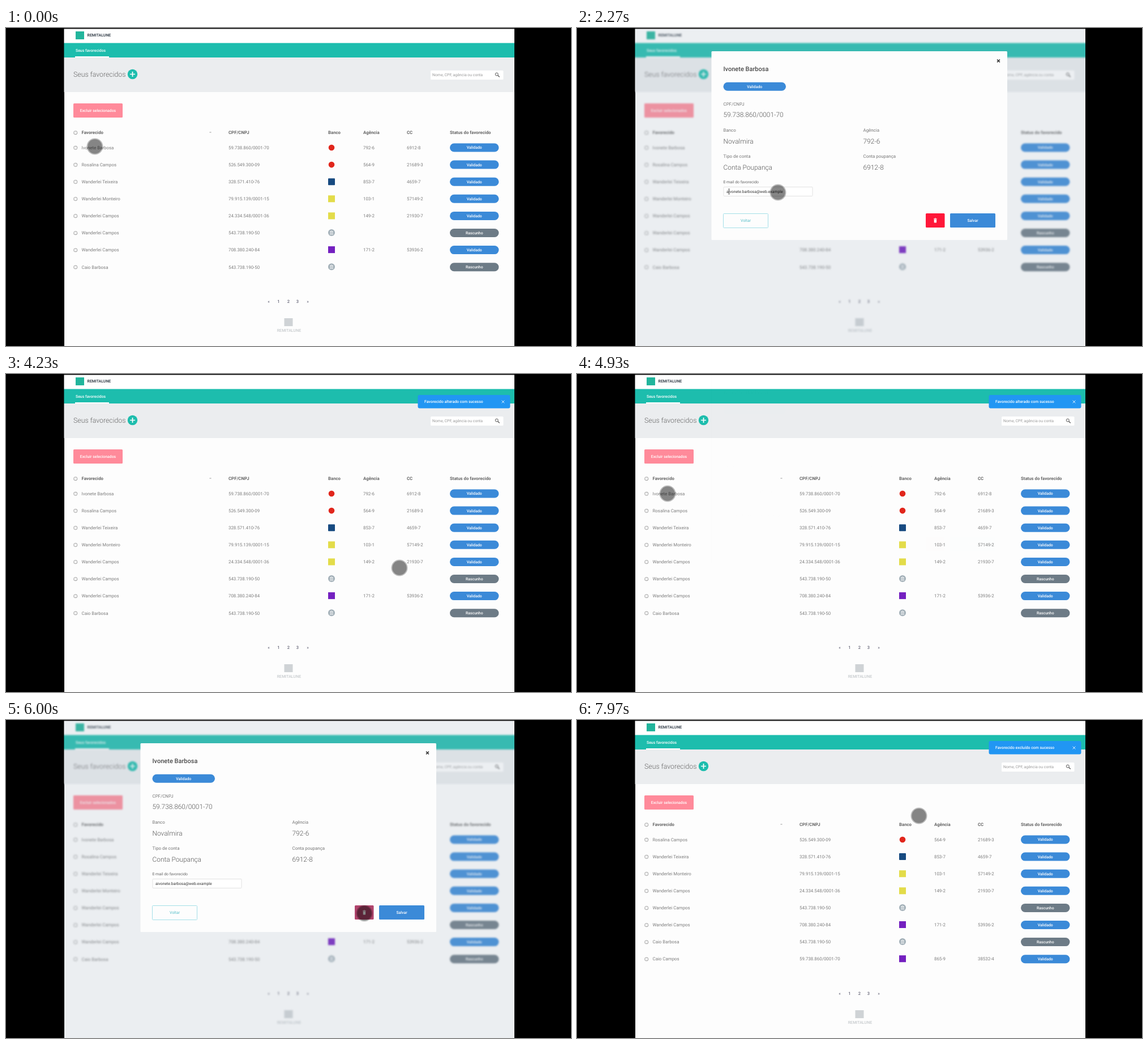
These frames come from a looping animation (998x561 px, 8 s). An HTML page:

```html
<!DOCTYPE html>
<html lang="pt-BR">
<head>
<meta charset="utf-8">
<title>Favorecidos</title>
<style>
html, body { margin: 0; width: 100%; height: 100%; overflow: hidden; background: #000; }
svg { display: block; width: 998px; height: 561px; }
text { font-family: Roboto, Arial, sans-serif; text-rendering: geometricPrecision; white-space: pre; }
.light { font-weight: 300; }
.mid { font-weight: 500; }
.bold { font-weight: 700; }
.c { text-anchor: middle; }

#page, #veil, #edit, #confirm, #cursor, #saved, #removed, .anim { animation: 8s linear infinite; }
#page { animation-name: blur; }
#veil { animation-name: veil; }
#edit { animation-name: edit; }
#confirm { animation-name: confirm; }
#cursor { animation-name: cursor; }
#saved { animation-name: saved; }
#removed { animation-name: removed; }
.anim { animation-timing-function: step-end; }
#first { animation-name: leave; }
#rest { animation-name: lift; }
#last { animation-name: enter; }
#mail { animation-name: before; }
#mail2 { animation-name: after; }
#caret { animation-name: caret; }
#saveBtn { animation-name: saveHover; }
#trashBtn { animation-name: trashHover; }
#okBtn { animation-name: okHover; }

@keyframes blur {
  0%, .375%, 44.9%, 61.625%, 91.2%, 100% { filter: blur(0px); }
  3.75%, 42.6%, 64.5%, 89.2% { filter: blur(1.7px); }
}
@keyframes veil {
  0%, .375%, 44.9%, 61.625%, 91.2%, 100% { opacity: 0; }
  3.75%, 42.6%, 64.5%, 89.2% { opacity: 1; }
}
@keyframes edit {
  0%, .375%, 61.625% { opacity: 0; transform: translateY(-40px); animation-timing-function: ease-out; }
  3.75%, 42.6%, 64.4%, 77.5% { opacity: 1; transform: none; }
  44.9%, 79.4%, 100% { opacity: 0; transform: translateY(-30px); }
}
@keyframes confirm {
  0%, 78.7% { opacity: 0; transform: translateY(-30px); animation-timing-function: ease-out; }
  82%, 89.2% { opacity: 1; transform: none; }
  91.2%, 100% { opacity: 0; transform: translateY(-30px); }
}
@keyframes saved {
  0%, 43.7% { opacity: 0; clip-path: inset(0); }
  45%, 64.1% { opacity: 1; clip-path: inset(0); }
  65.15% { opacity: 1; clip-path: inset(0 0 100% 0); }
  65.2%, 100% { opacity: 0; clip-path: inset(0 0 100% 0); }
}
@keyframes removed {
  0%, 90% { opacity: 0; }
  91.25%, 100% { opacity: 1; }
}
@keyframes leave { 0% { opacity: 1; } 90.2%, 100% { opacity: 0; } }
@keyframes enter { 0% { opacity: 0; } 90.2%, 100% { opacity: 1; } }
@keyframes lift { 0% { transform: none; } 90.2%, 100% { transform: translateY(-30.1px); } }
@keyframes before { 0% { opacity: 1; } 25.875%, 100% { opacity: 0; } }
@keyframes after { 0% { opacity: 0; } 25.875%, 100% { opacity: 1; } }
@keyframes caret {
  0% { opacity: 0; transform: translateX(330px); }
  19.125% { opacity: 1; transform: translateX(330px); }
  21.625% { opacity: 1; transform: translateX(264px); }
  25.875% { opacity: 1; transform: translateX(268px); }
  31.25%, 100% { opacity: 0; transform: translateX(268px); }
}
@keyframes saveHover { 0% { fill: #3b8ad8; } 38.3% { fill: #3a9ae0; } 46%, 100% { fill: #3b8ad8; } }
@keyframes trashHover { 0% { fill: #ff1739; } 73.8%, 100% { fill: #b0446c; } }
@keyframes okHover { 0% { fill: #ff1739; } 83.7%, 100% { fill: #b0446c; } }
@keyframes cursor {
  0%, 7.125% { transform: translate(157px, 209px); }
  10.375% { transform: translate(314px, 273px); }
  13.375%, 15.125% { transform: translate(301px, 310px); }
  15.875% { transform: translate(355px, 290px); }
  31% { transform: translate(355px, 290px); animation-timing-function: ease-in; }
  38.5% { transform: translate(690px, 340px); }
  40.875%, 52.4% { transform: translate(707px, 344px); }
  52.875% { transform: translate(695px, 342px); animation-timing-function: ease-in-out; }
  57% { transform: translate(150px, 152px); }
  59.125%, 62.5% { transform: translate(160px, 211px); }
  64.625% { transform: translate(228px, 246px); animation-timing-function: ease-out; }
  71.25%, 72% { transform: translate(670px, 359px); }
  75% { transform: translate(633px, 341px); }
  79% { transform: translate(633px, 341px); animation-timing-function: ease-in-out; }
  84.125%, 97.7% { transform: translate(659px, 145px); }
  99.625%, 100% { transform: translate(604px, 169px); }
}
</style>
</head>
<body>
<svg id="stage" viewBox="0 0 998 561"></svg>
<script>
const BLUE = '#3b8ad8', GREY = '#6d7b86', TEAL = '#1dbdad', INK = '#4a4a4a', SOFT = '#7d7d7d';

// y is the vertical middle of the line
const text = (x, y, str, size = 7.9, fill = SOFT, cls = '', attr = '') =>
  `<text x="${x}" y="${(y + size * .355).toFixed(2)}" font-size="${size}" fill="${fill}" class="${cls}" ${attr}>${str}</text>`;
const box = (x, y, w, h, fill, r = 0, attr = '') =>
  `<rect x="${x}" y="${y}" width="${w}" height="${h}" rx="${r}" fill="${fill}" ${attr}/>`;
const frame = (x, y, w, h, stroke, fill = 'none', r = 1) =>
  box(x + .5, y + .5, w - 1, h - 1, fill, r, `stroke="${stroke}"`);
const path = (d, stroke, width = 1) =>
  `<path d="${d}" fill="none" stroke="${stroke}" stroke-width="${width}"/>`;
const cross = (x, y, r, stroke, width) =>
  path(`M${x - r} ${y - r}l${2 * r} ${2 * r}m0 ${-2 * r}l${-2 * r} ${2 * r}`, stroke, width);
const pill = (x, y, w, label, fill) =>
  box(x, y - 7.5, w, 15, fill, 7.5) + text(x + w / 2, y, label, 6.9, '#fff', 'mid c');
const button = (x, y, w, label, fill, attr = '') =>
  box(x, y, w, 25, fill, 1.5, attr) + text(x + w / 2, y + 12.7, label, 6.9, '#fff', 'mid c');
const ghost = (x, y, label, stroke, ink) =>
  frame(x, y, 80, 26, stroke, '#fdfdfd') + text(x + 40, y + 13, label, 6.9, ink, 'c');
const check = y => frame(119.5, y - 3, 6.5, 6.5, '#999', '#fff', 1.5);

const banks = {
  red: y => `<circle cx="575" cy="${y}" r="5.3" fill="#e1261c"/>`,
  navy: y => box(569, y - 6, 12, 12, '#174a80', 1),
  yellow: y => box(569, y - 6, 12, 12, '#e3dc4a'),
  purple: y => box(569, y - 6.5, 12, 12, '#7420c0'),
  none: y => `<circle cx="575" cy="${y - .5}" r="6" fill="#a3b0b8"/>` +
    path(`M572 ${y - 1.8}l3 -2l3 2zM573 ${y - 1}v3m2 -3v3m2 -3v3M571.8 ${y + 2.5}h6.4`, '#fff', .8)
};

const people = [
  ['Ivonete Barbosa', '59.738.860/0001-70', 'red', '792-6', '6912-8'],
  ['Rosalina Campos', '526.549.300-09', 'red', '564-9', '21689-3'],
  ['Wanderlei Teixeira', '328.571.410-76', 'navy', '853-7', '4659-7'],
  ['Wanderlei Monteiro', '79.915.139/0001-15', 'yellow', '103-1', '57149-2'],
  ['Wanderlei Campos', '24.334.548/0001-36', 'yellow', '149-2', '21930-7'],
  ['Wanderlei Campos', '543.738.190-50', 'none', '', ''],
  ['Wanderlei Campos', '708.380.240-84', 'purple', '171-2', '53936-2'],
  ['Caio Barbosa', '543.738.190-50', 'none', '', ''],
  ['Caio Campos', '59.738.860/0001-70', 'purple', '865-9', '38532-4']
];
const rows = people.map(([name, id, bank, branch, account], i) => {
  const y = 211 + 30.1 * i, draft = bank === 'none';
  return check(y) + text(133.5, y, name) + text(393, y, id) + banks[bank](y) +
    text(631, y, branch) + text(708, y, account) +
    pill(784, y, 86.5, draft ? 'Rascunho' : 'Validado', draft ? GREY : BLUE);
});

const heads = [[133.5, 'Favorecido'], [393, 'CPF/CNPJ'], [569, 'Banco'], [631, 'Agência'], [708, 'CC'], [784, 'Status do favorecido']];
const pager = [[464, '«'], [481.5, '1'], [499, '2'], [515, '3'], [533, '»']];

const page = `
  ${box(60, -20, 880, 47, '#fff')}
  ${box(123, 6, 15, 14, '#22b59c')}${text(143.5, 13, 'REMITALUNE', 6.9, '#3c4650', 'bold')}
  ${box(60, 26.5, 880, 25.5, TEAL)}${text(123, 40, 'Seus favorecidos', 6.9, '#fff', 'mid')}
  ${box(60, 52, 880, 61, '#ebedef')}${box(122, 50, 60, 2, '#fff')}
  ${text(119, 82, 'Seus favorecidos', 12.3, '#666', 'light')}
  <circle cx="223.5" cy="81.5" r="8.7" fill="${TEAL}"/>${path('M219 81.5h9m-4.5 -4.5v9', '#fff', 1.7)}
  ${box(750, 75, 128.5, 16, '#fff', 1.5)}
  ${text(753, 83, 'Nome, CPF, agência ou conta', 6.9, '#999')}
  <circle cx="866.8" cy="81.6" r="2.5" fill="none" stroke="#555"/>${path('M868.7 83.5l3 3', '#555', 1.3)}
  ${button(119, 133, 87, 'Excluir selecionados', '#ff8a9a')}
  ${check(184.5)}${heads.map(([x, s]) => text(x, 184.5, s, 7.8, '#666', 'bold')).join('')}
  ${path('M359.5 184h3', '#999')}
  <g id="first" class="anim">${rows[0]}</g>
  <g id="rest" class="anim">${rows.slice(1, 8).join('')}<g id="last" class="anim">${rows[8]}</g></g>
  ${pager.map(([x, s]) => text(x, 482.5, s, 7.5, '#667', 'c mid')).join('')}
  ${box(491.5, 512, 15, 14, '#cfd3d6')}${text(500, 533.5, 'REMITALUNE', 7.1, '#c6cacd', 'c mid')}`;

const fields = [
  [259, 134, 'CPF/CNPJ', people[0][1]], [259, 180.5, 'Banco', 'Novalmira'], [506, 180.5, 'Agência', '792-6'],
  [259, 226.5, 'Tipo de conta', 'Conta Poupança'], [506, 226.5, 'Conta poupança', '6912-8']
];
const mail = 'ivonete.barbosa@web.example';

const edit = `
  ${box(237.5, 41, 522.5, 333, '#fdfdfd', 1.5)}
  ${cross(744.5, 58, 2.4, '#333', 1.5)}
  ${text(258.5, 72, people[0][0], 11, INK, 'mid')}
  ${pill(258.5, 103.3, 110.5, 'Validado', BLUE)}
  ${fields.map(([x, y, k, v]) => text(x - .5, y, k, 7.9, '#777') + text(x - .5, y + 19, v, 11.9, '#555', 'light')).join('')}
  ${text(258.5, 272, 'E-mail do favorecido', 6.9, '#666')}
  ${frame(258.5, 280, 158, 17, '#e2e2e2', '#fff')}
  ${text(264, 288.8, mail, 6.9, '#333', 'anim', 'id="mail"')}
  ${text(264, 288.8, 'a' + mail, 6.9, '#333', 'anim', 'id="mail2"')}
  ${box(0, 283, 1, 11, '#333', 0, 'id="caret" class="anim"')}
  ${ghost(258, 327, 'Voltar', '#a4dfe8', '#57bfc9')}
  ${box(616, 327, 33.5, 25, '#ff1739', 1.5, 'id="trashBtn" class="anim"')}
  ${box(630.7, 337.6, 4.4, 5.8, '#fff', .6)}${path('M630 336.7h5.8M632 335.7h1.8', '#fff', .9)}
  ${button(659, 327, 80, 'Salvar', BLUE, 'id="saveBtn" class="anim"')}`;

const confirmBox = `
  ${box(297.5, 22, 402.5, 168.5, '#fdfdfd', 1.5)}
  ${cross(684, 38.5, 2.4, '#333', 1.5)}
  ${text(318.5, 52, 'Excluir favorecido', 11.1, INK, 'mid')}
  ${text(318.5, 82, 'Você confirma a exclusão do favorecido ' + people[0][0], 9, INK, 'mid')}
  ${text(318.5, 98.3, 'O Histórico de pagamentos para este favorecido será mantido, mas ele será removido da', 9, '#444', 'light')}
  ${text(318.5, 108.5, 'sua lista de favorecidos.', 9, '#444', 'light')}
  ${ghost(318.5, 144.5, 'Cancelar', '#93e0d6', '#2fc0b0')}
  ${button(599, 144.5, 80, 'Confirmar exclusão', '#ff1739', 'id="okBtn" class="anim"')}`;

const toast = (id, msg) => `<g id="${id}">${box(727.5, 37, 163, 23.5, '#2196f3', 3)}
  ${text(739, 49, msg, 6.9, '#fff', 'mid')}${cross(878, 49, 2.4, '#d6ebff', 1)}</g>`;

document.getElementById('stage').innerHTML = `
  ${box(103, 2, 795, 559, '#fdfdfd')}
  <g id="page">${page}</g>
  ${box(103, 2, 795, 559, 'rgba(160,175,188,.2)', 0, 'id="veil"')}
  ${box(0, 0, 102.5, 561, '#000')}${box(898, 0, 100, 561, '#000')}${box(0, 0, 998, 1.5, '#000')}
  <g id="edit">${edit}</g>
  <g id="confirm">${confirmBox}</g>
  ${toast('saved', 'Favorecido alterado com sucesso')}
  ${toast('removed', 'Favorecido excluído com sucesso')}
  <g id="cursor"><circle r="14.5" fill="#000" fill-opacity=".25"/><circle r="12.7" fill="#000" fill-opacity=".3"/></g>`;
</script>
</body>
</html>
```
